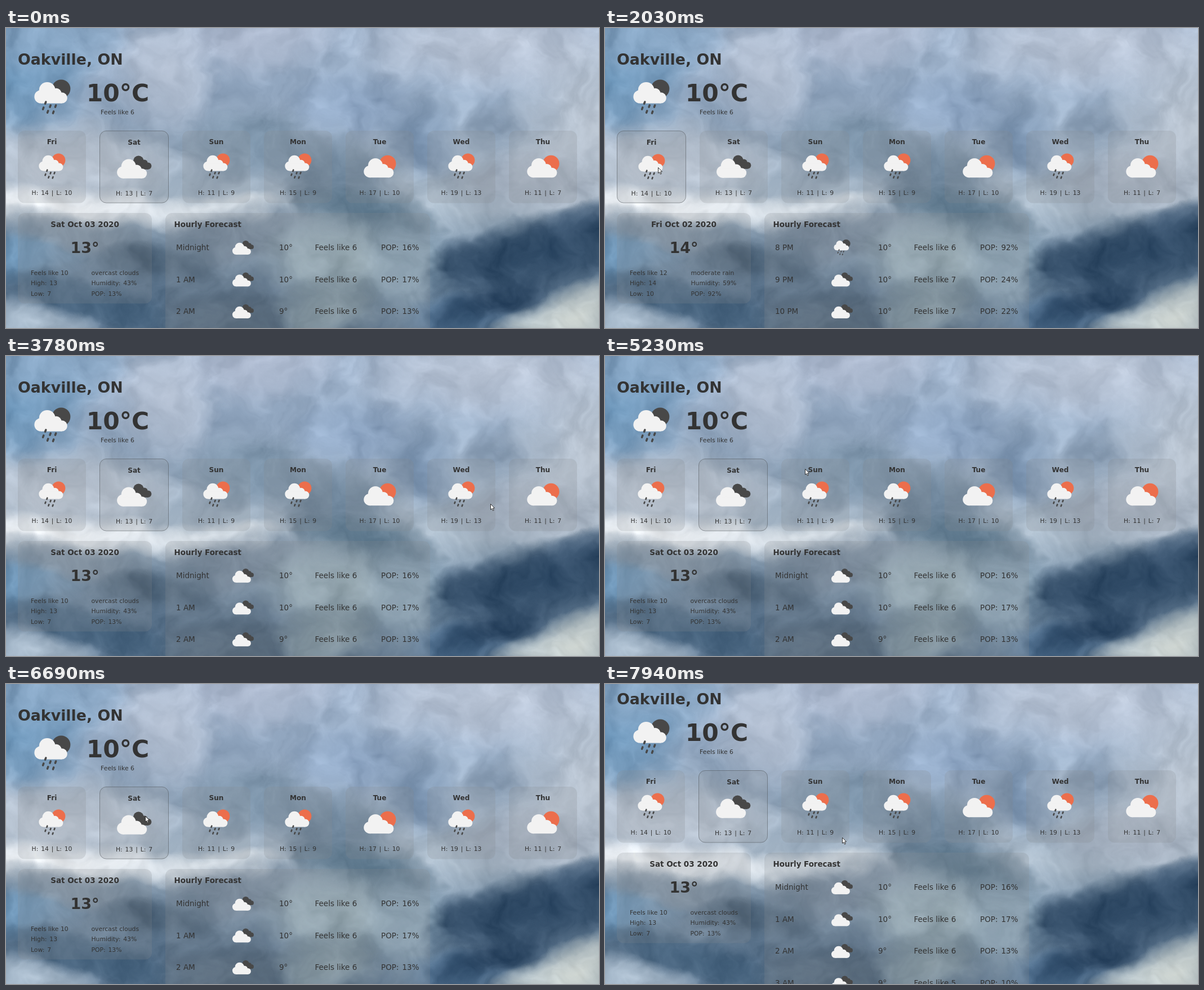
These frames come from a looping animation (1053 px wide and 532 px high, 8 s). An HTML page with a canvas:

```html
<!DOCTYPE html>
<html lang="en">
<head>
<meta charset="utf-8">
<title>Weather forecast</title>
<style>
  html, body { margin: 0; width: 100%; height: 100%; overflow: hidden; background: #8ea3b8; }
  canvas { display: block; }
</style>
</head>
<body>
<canvas id="stage" width="1053" height="532"></canvas>
<script>
const W = 1053, H = 532, LOOP = 8000;
const ctx = document.getElementById('stage').getContext('2d');
const INK = '#333', WHITE = '#f2f2f2', DARK = '#484848', SUN = '#ec6e4c';

// ---------- sky ----------

// x, y, radius x, radius y, angle in degrees, colour
const upperSky = [
  [20, 90, 150, 110, 0, '#719bbf'],
  [60, 5, 220, 75, 0, '#7f9fbe'],
  [290, 70, 100, 120, -12, '#b3bfd1'],
  [440, 15, 150, 80, 0, '#adb9ce'],
  [880, 30, 270, 100, 0, '#b8c3d4'],
  [620, 140, 120, 70, 0, '#8fa7c5'],
  [1050, 180, 190, 170, 0, '#bdc7d3'],
  [440, 205, 140, 75, 0, '#7c94aa'],
  [740, 200, 90, 75, 0, '#7d96b3'],
  [100, 240, 230, 85, 0, '#c0cad7'],
  [590, 260, 120, 85, 0, '#6b8399'],
  [930, 270, 150, 70, 0, '#a9b4c3']
];
const lowerSky = [
  [90, 318, 330, 40, 2, '#f0f3f6'],
  [380, 318, 120, 28, 0, '#d5dce2'],
  [640, 325, 130, 48, 8, '#4f6b80'],
  [10, 400, 130, 60, 0, '#6f98bb'],
  [110, 362, 180, 36, 8, '#8495a6'],
  [420, 365, 170, 55, 0, '#76889b'],
  [590, 410, 160, 85, 0, '#9fb4bd'],
  [700, 430, 95, 110, 0, '#8ba4b6'],
  [240, 412, 120, 34, 4, '#4c6277'],
  [1030, 345, 130, 42, -14, '#5a728c'],
  [950, 395, 220, 75, -14, '#27425e'],
  [830, 420, 110, 70, 0, '#2b4560'],
  [790, 510, 110, 40, 0, '#58799a'],
  [860, 485, 130, 38, -18, '#2d4763'],
  [1005, 515, 185, 66, -24, '#d6dcd7'],
  [160, 485, 220, 40, 14, '#3f5c77'],
  [50, 520, 120, 42, 10, '#b0c1d1'],
  [400, 520, 130, 60, 0, '#465b6f'],
  [560, 500, 100, 60, 0, '#8a9ea8']
];

function softEllipse(g, [x, y, rx, ry, angle, color]) {
  const fade = g.createRadialGradient(0, 0, 0, 0, 0, 1);
  fade.addColorStop(0, color + 'f4');
  fade.addColorStop(0.5, color + 'b8');
  fade.addColorStop(1, color + '00');
  g.save();
  g.translate(x, y);
  g.rotate(angle * Math.PI / 180);
  g.scale(rx, ry);
  g.fillStyle = fade;
  g.fillRect(-1, -1, 2, 2);
  g.restore();
}

function makeNoise(seed) {
  const cells = new Float32Array(65536);
  for (let i = 0; i < cells.length; i++) {
    seed = (Math.imul(seed, 1664525) + 1013904223) >>> 0;
    cells[i] = seed / 2147483648 - 1;
  }
  const at = (x, y) => cells[((y & 255) << 8) | (x & 255)];
  const smooth = v => v * v * (3 - 2 * v);
  const single = (x, y) => {
    const ix = Math.floor(x), iy = Math.floor(y);
    const u = smooth(x - ix), v = smooth(y - iy);
    const top = at(ix, iy) + (at(ix + 1, iy) - at(ix, iy)) * u;
    const low = at(ix, iy + 1) + (at(ix + 1, iy + 1) - at(ix, iy + 1)) * u;
    return top + (low - top) * v;
  };
  return (x, y, octaves) => {
    let sum = 0, amp = 0.5;
    for (let i = 0; i < octaves; i++) {
      sum += amp * single(x, y);
      x = x * 2 + 17; y = y * 2 + 31; amp *= 0.5;
    }
    return sum;
  };
}

function paintSky() {
  const sky = document.createElement('canvas');
  sky.width = W; sky.height = H;
  const g = sky.getContext('2d');
  const base = g.createLinearGradient(0, 0, 0, H);
  [[0, '#9db0c8'], [.2, '#98adc6'], [.45, '#96a9bd'], [.6, '#a4b4c3'], [.7, '#70879d'], [1, '#506a84']]
    .forEach(([stop, color]) => base.addColorStop(stop, color));
  g.fillStyle = base;
  g.fillRect(0, 0, W, H);
  [...upperSky, ...lowerSky].forEach(e => softEllipse(g, e));

  // Bend the soft shapes into ragged clouds and add a fine grain of light.
  const from = g.getImageData(0, 0, W, H), to = g.createImageData(W, H);
  const noise = makeNoise(7);
  const clamp = (v, max) => Math.max(0, Math.min(max, v));
  for (let y = 0; y < H; y++) {
    for (let x = 0; x < W; x++) {
      const dx = noise(x / 75, y / 60, 4), dy = noise(x / 75 + 90, y / 60 + 40, 4);
      const sx = clamp(Math.round(x + dx * 44), W - 1);
      const sy = clamp(Math.round(y + dy * 20), H - 1);
      const light = noise((x + dx * 50) / 48, (y + dy * 50) / 52 + 120, 5) * 30;
      const a = (sy * W + sx) * 4, b = (y * W + x) * 4;
      for (let c = 0; c < 3; c++) to.data[b + c] = from.data[a + c] + light;
      to.data[b + 3] = 255;
    }
  }
  g.putImageData(to, 0, 0);
  return sky;
}

// ---------- drawing helpers ----------

function text(str, x, y, size, { bold = false, align = 'left' } = {}) {
  ctx.font = `${bold ? 'bold ' : ''}${size}px "DejaVu Sans", sans-serif`;
  ctx.wordSpacing = str.includes(':') ? `${size * 0.13}px` : '0px';
  ctx.textAlign = align;
  ctx.fillStyle = INK;
  ctx.fillText(str, x, y);
}

function circle(x, y, r, color) {
  ctx.fillStyle = color;
  ctx.beginPath();
  ctx.arc(x, y, r, 0, Math.PI * 2);
  ctx.fill();
}

function panel(x, y, w, h, selected) {
  ctx.beginPath();
  ctx.roundRect(x, y, w, h, 12);
  ctx.fillStyle = 'rgba(134,136,140,.22)';
  ctx.fill();
  if (!selected) return;
  ctx.beginPath();
  ctx.roundRect(x + .5, y + .5, w - 1, h - 1, 11.5);
  ctx.strokeStyle = 'rgba(70,74,78,.45)';
  ctx.lineWidth = 1;
  ctx.stroke();
}

function cloud(x, y, scale, color) {
  ctx.save();
  ctx.translate(x, y);
  ctx.scale(scale, scale);
  circle(23, 14.5, 14.5, color);
  circle(11.8, 26.2, 11.8, color);
  circle(39, 20.5, 9.5, color);
  circle(49.3, 28.3, 9.7, color);
  ctx.fillRect(11.8, 20, 37.5, 18);
  ctx.restore();
}

function drops() {
  ctx.strokeStyle = DARK;
  ctx.lineWidth = 3.6;
  ctx.lineCap = 'round';
  for (const [x, y] of [[20, 37], [28.5, 43], [38, 43], [16, 47], [24, 53], [34, 54]]) {
    ctx.beginPath();
    ctx.moveTo(x + .6, y - 1.6);
    ctx.lineTo(x - .6, y + 1.6);
    ctx.stroke();
  }
}

// Each icon is drawn around its own centre.
const icons = {
  rain(sun) {
    ctx.scale(.73, .73);
    ctx.translate(-32.2, -26.3);
    circle(48, 12, 16.5, sun);
    cloud(0, 0, 1, WHITE);
    drops();
  },
  overcast() {
    ctx.translate(-30.7, -19.5);
    cloud(23.5, 0, .64, DARK);
    cloud(0, 6, .9, WHITE);
  },
  fair() {
    ctx.translate(-28.5, -19.5);
    circle(42.5, 15, 14.7, SUN);
    cloud(0, 5.5, .9, WHITE);
  }
};

function icon(name, x, y, scale, sun = SUN) {
  ctx.save();
  ctx.translate(x, y);
  ctx.scale(scale, scale);
  icons[name](sun);
  ctx.restore();
}

// ---------- forecast ----------

const days = [
  ['Fri', 'rain', 14, 10], ['Sat', 'overcast', 13, 7], ['Sun', 'rain', 11, 9],
  ['Mon', 'rain', 15, 9], ['Tue', 'fair', 17, 10], ['Wed', 'rain', 19, 13], ['Thu', 'fair', 11, 7]
];

const FRI = 0, SAT = 1, SUNDAY = 2;
const details = {
  [FRI]: {
    date: 'Fri Oct 02 2020', feels: 12, sky: 'moderate rain', humidity: 59, pop: 92, column: 153,
    hours: [['8 PM', 'rain', 10, 6, 92], ['9 PM', 'overcast', 10, 7, 24],
            ['10 PM', 'overcast', 10, 7, 22], ['11 PM', 'overcast', 10, 7, 18]]
  },
  [SAT]: {
    date: 'Sat Oct 03 2020', feels: 10, sky: 'overcast clouds', humidity: 43, pop: 13, column: 152,
    hours: [['Midnight', 'overcast', 10, 6, 16], ['1 AM', 'overcast', 10, 6, 17],
            ['2 AM', 'overcast', 9, 6, 13], ['3 AM', 'overcast', 9, 5, 10]]
  },
  [SUNDAY]: {
    date: 'Sun Oct 04 2020', feels: 8, sky: 'light rain', humidity: 55, pop: 38, column: 153,
    hours: []
  }
};

function drawNow() {
  text('Oakville, ON', 21, 65, 26.8, { bold: true });
  icon('rain', 82.3, 122, 1.36, DARK);
  text('10°C', 198.5, 129.5, 42.5, { bold: true, align: 'center' });
  text('Feels like 6', 198, 153, 10.8, { align: 'center' });
}

function drawWeek(selected) {
  days.forEach(([name, sky, high, low], i) => {
    const on = i === selected;
    const x = 21 + 145 * i + (i > selected ? 2 : 0);
    const w = on ? 123 : 121, mid = x + w / 2, dy = on ? 1 : 0;
    panel(x, 182, w, 128.5, on);
    text(name, mid, 206 + dy, 12.1, { bold: true, align: 'center' });
    icon(sky, mid + .3, 245 + dy, 1);
    text(`H: ${high} | L: ${low}`, mid, 296 + dy, 10.8, { align: 'center' });
  });
}

function drawDay(selected) {
  const d = details[selected], [, , high, low] = days[selected];
  panel(21, 328, 238, 160.5);
  text(d.date, 140, 352.5, 13.5, { bold: true, align: 'center' });
  text(`${high}°`, 140, 399, 27, { bold: true, align: 'center' });
  const left = [`Feels like ${d.feels}`, `High: ${high}`, `Low: ${low}`];
  const right = [d.sky, `Humidity: ${d.humidity}%`, `POP: ${d.pop}%`];
  for (let i = 0; i < 3; i++) {
    const y = 437.5 + 18.6 * i;
    text(left[i], 44, y, 10.8);
    text(right[i], d.column - .5, y, 10.8);
  }
}

function drawHours(selected) {
  const { hours } = details[selected];
  if (!hours.length) return;
  panel(283, 328, 470, 270);
  text('Hourly Forecast', 298.5, 352.5, 13.4, { bold: true });
  hours.forEach(([time, sky, temp, feels, pop], i) => {
    const y = 394.3 + 56.5 * i;
    text(time, 302, y, 13.5);
    icon(sky, 421, y - 5.3, .62, DARK);
    text(`${temp}°`, 485, y, 13.5);
    text(`Feels like ${feels}`, 548.5, y, 13.5);
    text(`POP: ${pop}%`, 666, y, 13.5);
  });
}

// ---------- pointer and timing ----------

// The pointer moves in even ticks and rests between them.
const FIRST = 410, TICK = 77.5;

// tick, x, y
const path = [
  [0, 1040, 518], [3, 800, 250], [6, 430, 60], [10, 244, 154], [12, 61, 105],
  [13, 51, 158], [14, 51, 158], [17, 84, 245], [20, 94, 247], [24, 153, 232],
  [29, 255, 244], [33, 256, 245], [41, 834, 250], [43, 860, 262], [47, 965, 252],
  [49, 955, 250], [52, 831, 245], [62, 355, 200], [63, 352, 193], [67, 353, 195],
  [75, 310, 236], [78, 250, 237], [81, 247, 234], [86, 420, 270], [87, 421, 271.6]
];

// A press glows; its release selects the day.
const clicks = [[1760, FRI], [2820, SAT], [5470, SUNDAY], [6430, SAT]];
const PRESS = 90;

function pointerAt(t) {
  const tick = Math.floor((t - FIRST) / TICK);
  if (tick < 0) return null;
  const i = path.findIndex(p => p[0] > tick);
  if (i < 0) return path[path.length - 1].slice(1);
  const [t0, x0, y0] = path[i - 1], [t1, x1, y1] = path[i];
  const k = (tick - t0) / (t1 - t0);
  return [x0 + (x1 - x0) * k, y0 + (y1 - y0) * k];
}

function drawPointer(t) {
  const pos = pointerAt(t);
  if (!pos) return;
  const [x, y] = pos.map(Math.round);
  if (clicks.some(([at]) => t >= at && t < at + PRESS)) circle(x + 1, y - 1, 9.3, 'rgba(202,204,50,.85)');
  ctx.save();
  ctx.translate(x + .5, y + .5);
  ctx.beginPath();
  for (const [px, py] of [[0, 0], [0, 10], [2.3, 8], [4, 11.7], [5.7, 11], [4, 7.4], [7, 7.2]]) ctx.lineTo(px, py);
  ctx.closePath();
  ctx.fillStyle = '#fff';
  ctx.fill();
  ctx.strokeStyle = '#222';
  ctx.lineWidth = .9;
  ctx.lineJoin = 'round';
  ctx.stroke();
  ctx.restore();
}

function selectedAt(t) {
  return clicks.reduce((day, [at, next]) => t >= at + PRESS ? next : day, SAT);
}

const scrollAt = t => t >= 7940 ? 29 : t >= 7850 ? 10 : 0;

const sky = paintSky();
let start;

function frame() {
  const now = performance.now();
  start ??= now;
  const t = (now - start) % LOOP, selected = selectedAt(t);
  ctx.drawImage(sky, 0, 0);
  ctx.save();
  ctx.translate(0, -scrollAt(t));
  drawNow();
  drawWeek(selected);
  drawDay(selected);
  drawHours(selected);
  ctx.restore();
  drawPointer(t);
  requestAnimationFrame(frame);
}
frame();
</script>
</body>
</html>
```
